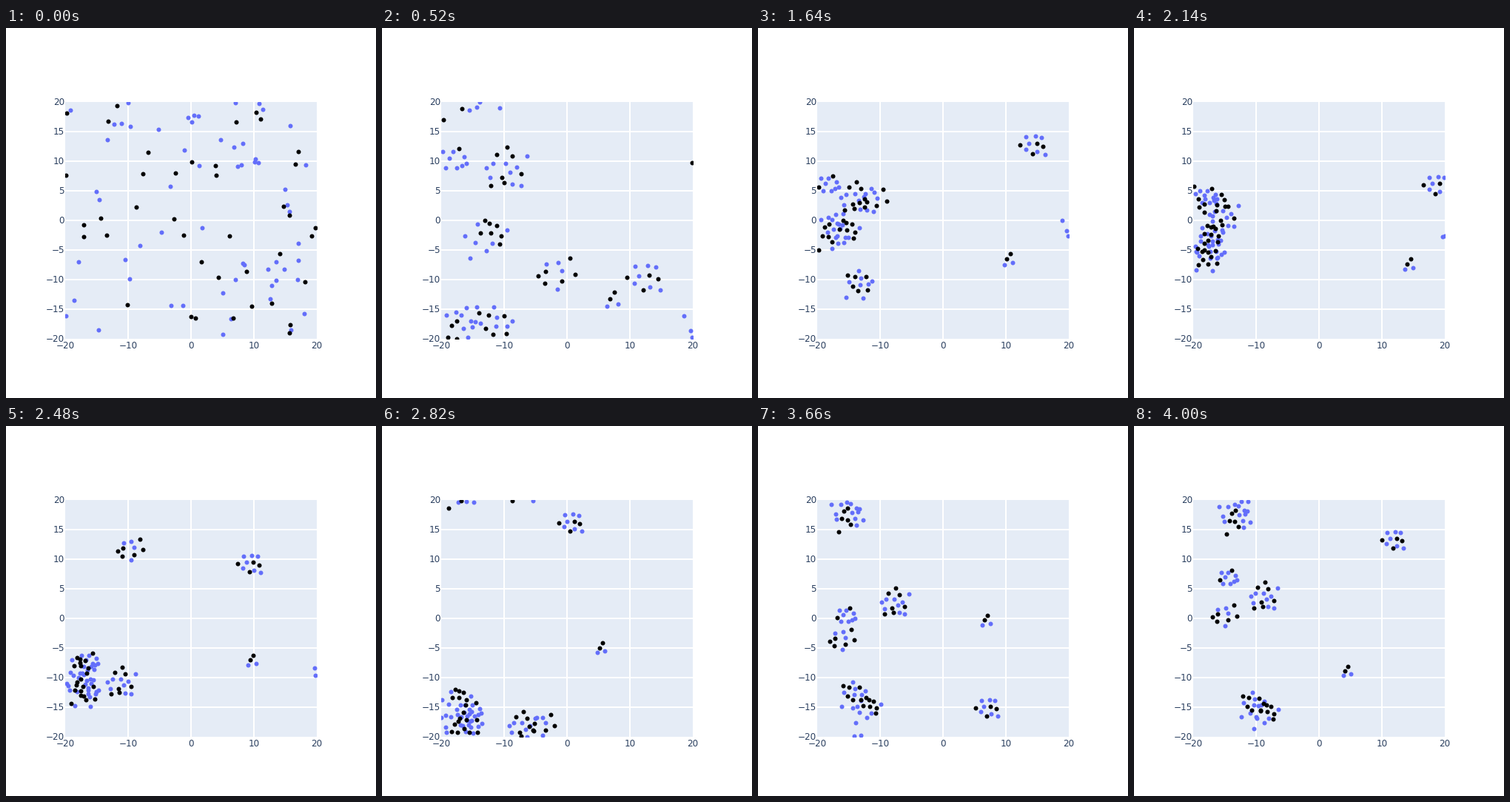
Recreate the animation shown at these times as a matplotlib script. Size 500x500 px, loop 4.02 s.

```python
import numpy as np
import matplotlib.pyplot as plt
from matplotlib.animation import FuncAnimation

DPI, SIZE, HALF = 100, 500, 20
PX = 72 / DPI
FRAMES, STEP_MS = 201, 20
INK, PANEL = "#2a3f5f", "#e5ecf6"
rng = np.random.default_rng(4)

# Each flock: blue and black members, then the waypoints of its centre
TIMES = np.array([0, 26, 57, 107, 141, 166, 200])
FLOCKS = [
    (15, 6, [(-17, -18), (-18, -5), (-17.3, -4), (-17, -18), (-16.3, 18.8), (-13, 17.6)]),
    (8, 6, [(-11.5, -17.4), (-9.3, -17.5), (-17.5, -6), (-15.4, -18), (-16.8, -12.2), (-10.5, -14.3)]),
    (7, 7, [(-12.7, -2.4), (-13.6, -3.3), (-17.5, -2.5), (-17.5, -13.6), (-15, -14.2), (-8.6, -15.9)]),
    (8, 2, [(-18, 10.5), (-18, 5.3), (-17.7, 4.2), (-15, -15.4), (-15.9, -5.8), (-14.4, 7)]),
    (9, 7, [(-9.6, 8.5), (-10.5, 3.5), (-15.1, .8), (-7, -18.4), (-6.8, -1.2), (-8.7, 3.5)]),
    (4, 6, [(-1.7, -9), (-2.4, 5), (-17, 2.5), (-4, -18), (-15, -8.3), (-15, .5)]),
    (7, 4, [(12.3, -9.6), (7.4, -16.6), (18.6, 6), (.6, 16.2), (3.1, -8.9), (11.8, 13.3)]),
    (2, 2, [(7.5, -13.4), (5.4, -6.9), (14.5, -7.4), (5.6, -5), (8.4, 4.4), (4.6, -8.9)]),
]


def wrap(p):
    return (p + HALF) % (2 * HALF) - HALF


def formation(n):
    """Evenly spaced members around a centre, with a few stragglers."""
    i = np.arange(n)
    r = .6 * np.sqrt(i + .5) * rng.lognormal(0, .2, n)
    a = i * 2.39996 + rng.uniform(0, 2 * np.pi)
    return rng.permutation(np.column_stack([r * np.cos(a), r * np.sin(a)]))


def flight(centres, offsets):
    """Members' places at every waypoint; the flock tightens as it goes."""
    loose = 1 + np.exp(-TIMES[1:] / 40)
    return np.array(centres)[:, None] + loose[:, None, None] * offsets


def match(here, there):
    """Pair boids with places by swapping until no swap shortens the trips."""
    cost = (wrap(there[None] - here[:, None]) ** 2).sum(axis=2)
    order = np.arange(len(here))
    while True:
        c = cost[:, order]
        d = np.diag(c)
        gain = c + c.T - d[:, None] - d[None]
        i, j = np.unravel_index(gain.argmin(), gain.shape)
        if gain[i, j] > -1e-9:
            return order
        order[[i, j]] = order[[j, i]]


def build(members):
    """Scatter boids, join the nearest flocks and unwrap their paths."""
    goals = np.concatenate(members, axis=1)
    start = rng.uniform(-HALF, HALF, goals.shape[1:])
    path = np.concatenate([start[None], goals[:, match(start, goals[0])]])
    path = np.concatenate([path[:1], wrap(np.diff(path, axis=0))]).cumsum(axis=0)
    return path, np.gradient(path, TIMES, axis=0)


blue, black = [], []
for nb, nk, centres in FLOCKS:
    places = flight(centres, formation(nb + nk))
    blue.append(places[:, :nb])
    black.append(places[:, nb:])
swarms = [build(blue), build(black)]


def place(path, speed, t):
    """Smooth cubic flight through the waypoints."""
    k = min(np.searchsorted(TIMES, t, side="right") - 1, len(TIMES) - 2)
    span = TIMES[k + 1] - TIMES[k]
    u = (t - TIMES[k]) / span
    s = u * u * (3 - 2 * u)
    p = (1 - s) * path[k] + s * path[k + 1]
    return wrap(p + span * u * (1 - u) * ((1 - u) * speed[k] - u * speed[k + 1]))


fig = plt.figure(figsize=(SIZE / DPI, SIZE / DPI), dpi=DPI, facecolor="white")
ax = fig.add_axes([.16, .16, .68, .64], facecolor=PANEL)
ax.set(xlim=(-HALF, HALF), ylim=(-HALF, HALF), xticks=[], yticks=[])
ax.spines[:].set_visible(False)


def label(x, y, n, ha):
    fig.text(x / SIZE, 1 - y / SIZE, str(n).replace("-", "\u2212"), ha=ha, va="baseline",
             color=INK, family="DejaVu Sans", size=12 * PX)


for n in range(-20, 21, 10):
    label(250 + n * 8.5, 433, n, "center")
    if abs(n) < HALF:
        ax.axvline(n, color="white", lw=2 * PX, zorder=1)
for n in range(-20, 21, 5):
    label(79, 260 - n * 8 + 4.2, n, "right")
    if abs(n) < HALF:
        ax.axhline(n, color="white", lw=2 * PX, zorder=1)

dots = [ax.plot([], [], "o", color=c, ms=6 * PX, mew=0, zorder=z)[0]
        for c, z in (("#636efa", 3), ("black", 4))]


def draw(t):
    for d, swarm in zip(dots, swarms):
        d.set_data(*place(*swarm, t).T)
    return dots


anim = FuncAnimation(fig, draw, frames=FRAMES, interval=STEP_MS, repeat=True)
plt.show()
```
